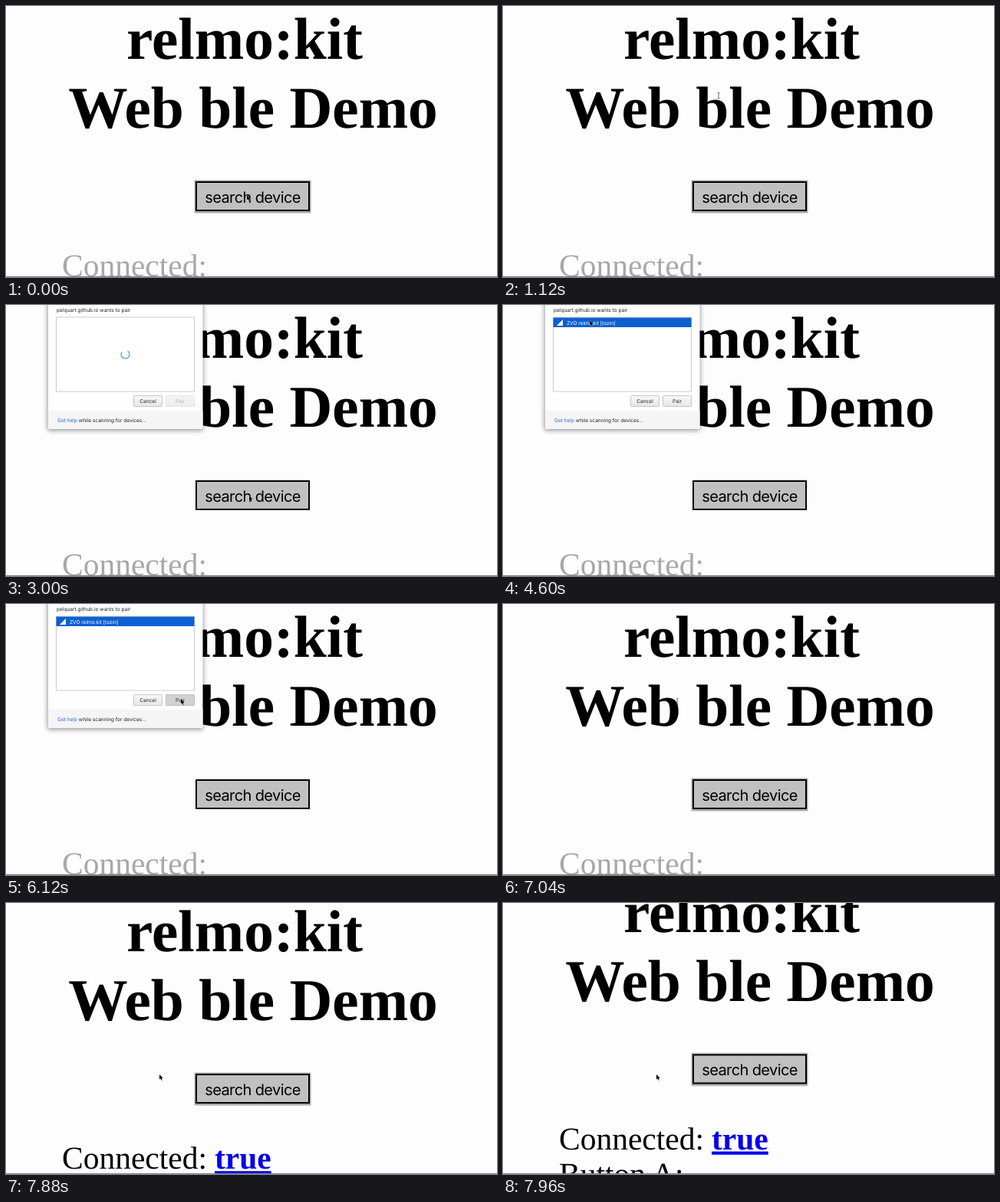
Recreate the animation shown at these times as an HTML page. Size 640x354 px, loop 8000 ms.

```html
<!DOCTYPE html>
<html lang="en">
<head>
<meta charset="utf-8">
<title>Web ble Demo</title>
<style>
  html, body { margin: 0; width: 100%; height: 100%; overflow: hidden; background: #fdfdfd; }
  svg { display: block; width: 640px; height: 354px; }
  text { text-rendering: geometricPrecision; white-space: pre; }
  .title { font: bold 77.4px "Liberation Serif", serif; }
  .line { font: 41.5px "Liberation Serif", serif; }
  .true { font-weight: bold; fill: #0000ee; text-decoration: underline; }
  .search { font: 20px Inter, sans-serif; letter-spacing: -.03em; text-anchor: middle; }
  .ui { font: 6.55px Inter, sans-serif; fill: #222; }
  .mid { text-anchor: middle; }

  .page, .ring, .status, .true, .popup, .spinner, .row, .sel, .off, .press, .cursor, .arrow, .beam {
    animation: 8s step-end infinite;
  }
  .page { animation-name: scroll; }
  .ring { animation-name: ring; }
  .status { animation-name: status; }
  .true { animation-name: true; }
  .popup { animation-name: popup; animation-timing-function: linear; }
  .spinner { animation-name: search; }
  .row { animation-name: found; }
  .sel { animation-name: select; }
  .off { animation-name: disabled; }
  .press { animation-name: press; }
  .cursor { animation-name: move; animation-timing-function: ease-in-out; }
  .arrow { animation-name: arrow; }
  .beam { animation-name: beam; }
  .arc { transform-origin: 155.5px 64.5px; animation: spin 1s linear infinite; }

  @keyframes scroll {
    0% { transform: none; }
    98% { transform: translateY(-.5px); }
    98.5% { transform: translateY(-6px); }
    99% { transform: translateY(-16px); }
    99.5%, 100% { transform: translateY(-31.6px); }
  }
  @keyframes ring { 0%, 81% { opacity: 1; } 33.5% { opacity: 0; } }
  @keyframes status { 0% { fill: #a8a8a8; } 89.5%, 100% { fill: #000; } }
  @keyframes true { 0% { opacity: 0; } 89.5%, 100% { opacity: 1; } }
  @keyframes popup {
    0%, 33% { opacity: 0; }
    35%, 80.5% { opacity: 1; }
    82%, 100% { opacity: 0; }
  }
  @keyframes search { 0% { opacity: 1; } 43%, 100% { opacity: 0; } }
  @keyframes found { 0% { opacity: 0; } 43%, 100% { opacity: 1; } }
  @keyframes select { 0% { opacity: 0; } 57.5%, 100% { opacity: 1; } }
  @keyframes disabled { 0% { opacity: 1; } 57.5%, 100% { opacity: 0; } }
  @keyframes press { 0%, 79% { opacity: 0; } 76.5% { opacity: 1; } }
  @keyframes move {
    0%, 6% { transform: translate(314px, 247px); }
    14%, 20.5% { transform: translate(281px, 117px); }
    30%, 49.5% { transform: translate(317px, 249px); }
    54.5%, 61% { transform: translate(113px, 20px); }
    69%, 87.5% { transform: translate(228px, 124px); }
    91.5%, 100% { transform: translate(200px, 224px); }
  }
  @keyframes arrow { 0%, 24.5%, 89.5%, 100% { opacity: 1; } 10.5%, 81.5% { opacity: 0; } }
  @keyframes beam { 0%, 24.5%, 89.5%, 100% { opacity: 0; } 10.5%, 81.5% { opacity: 1; } }
  @keyframes spin { to { transform: rotate(360deg); } }
</style>
</head>
<body>
<svg viewBox="0 0 640 354">
  <defs>
    <filter id="soft" x="-20%" y="-20%" width="140%" height="140%"><feGaussianBlur stdDeviation="3"/></filter>
    <filter id="glow" x="-5%" y="-20%" width="110%" height="140%"><feGaussianBlur stdDeviation=".7"/></filter>
    <linearGradient id="btn" x2="0" y2="1">
      <stop stop-color="#f8f8f8"/><stop offset="1" stop-color="#e6e6e6"/>
    </linearGradient>
  </defs>
  <rect width="640" height="354" fill="#fdfdfd"/>

  <g class="page">
    <text class="title" x="157" y="69.3">relmo:kit</text>
    <text class="title" x="81.3" y="159.3">Web ble Demo</text>
    <rect class="ring" x="245.5" y="227.500" width="152" height="43" rx="1" fill="#a9a9a9" filter="url(#glow)"/>
    <rect x="248" y="230" width="147" height="37" fill="#c0c0c0" stroke="#000" stroke-width="2"/>
    <text class="search" x="321.5" y="256.600">search device</text>
    <text class="line status" x="73" y="353.2">Connected:</text>
    <text class="line true" x="272" y="353.2">true</text>
    <text class="line" x="73" y="400">Button A:</text>
  </g>
  <rect y="353" width="640" height="1" fill="#858585"/>

  <g class="popup">
    <rect x="54" y="-8" width="203" height="172" rx="3" opacity=".4" filter="url(#soft)"/>
    <rect x="55" y="-8" width="201.5" height="170" rx="2" fill="#fefefe"/>
    <path d="M55 138H256.5V160a2 2 0 0 1-2 2H57a2 2 0 0 1-2-2Z" fill="#f5f5f5"/>
    <text class="ui" x="66" y="9">pelquart.github.io wants to pair</text>
    <rect x="65.5" y="16" width="180" height="97" fill="#fff" stroke="#bdbdbd" stroke-width=".8"/>

    <g class="spinner">
      <path class="arc" d="M158.5 59.9A5.5 5.5 0 1 1 150.9 61.5" fill="none" stroke="#4285e4" stroke-width="1.2"/>
    </g>
    <g class="row">
      <path d="M70 27L78 19V27Z" fill="#5a5a5a"/>
      <text class="ui" x="83" y="25.5">ZVO relmo:kit [tozin]</text>
      <g class="sel">
        <rect x="65.5" y="16.5" width="180" height="12.5" fill="#0c60cf"/>
        <path d="M70 27L78 19V27Z" fill="#fff"/>
        <text class="ui" x="83" y="25.5" style="fill:#fff">ZVO relmo:kit [tozin]</text>
      </g>
    </g>

    <g fill="url(#btn)" stroke="#b4b4b4" stroke-width=".7">
      <rect x="166.5" y="118.5" width="37" height="14" rx="1"/>
      <rect x="208.5" y="118.5" width="37" height="14" rx="1"/>
      <rect class="press" x="208.5" y="118.5" width="37" height="14" rx="1" style="fill:#d2d2d2"/>
    </g>
    <text class="ui mid" x="185" y="128">Cancel</text>
    <text class="ui mid" x="227" y="128">Pair</text>
    <rect class="off" x="208" y="118" width="38" height="15" fill="#f2f2f2" fill-opacity=".7"/>
    <text class="ui" x="67" y="153"><tspan fill="#2a72d8">Get help</tspan> while scanning for devices...</text>
  </g>

  <g class="cursor">
    <path class="arrow" d="M0 0V6.6L1.5 5.3L2.6 7.8L3.7 7.3L2.6 4.8H4.7Z" fill="#000" stroke="#fff" stroke-width=".6" paint-order="stroke"/>
    <path class="beam" d="M-1.5 -4Q0 -4 0 -3Q0 -4 1.5 -4M0 -3V3M-1.5 4Q0 4 0 3Q0 4 1.5 4" fill="none" stroke="#555" stroke-width=".9"/>
  </g>
</svg>
</body>
</html>
```
